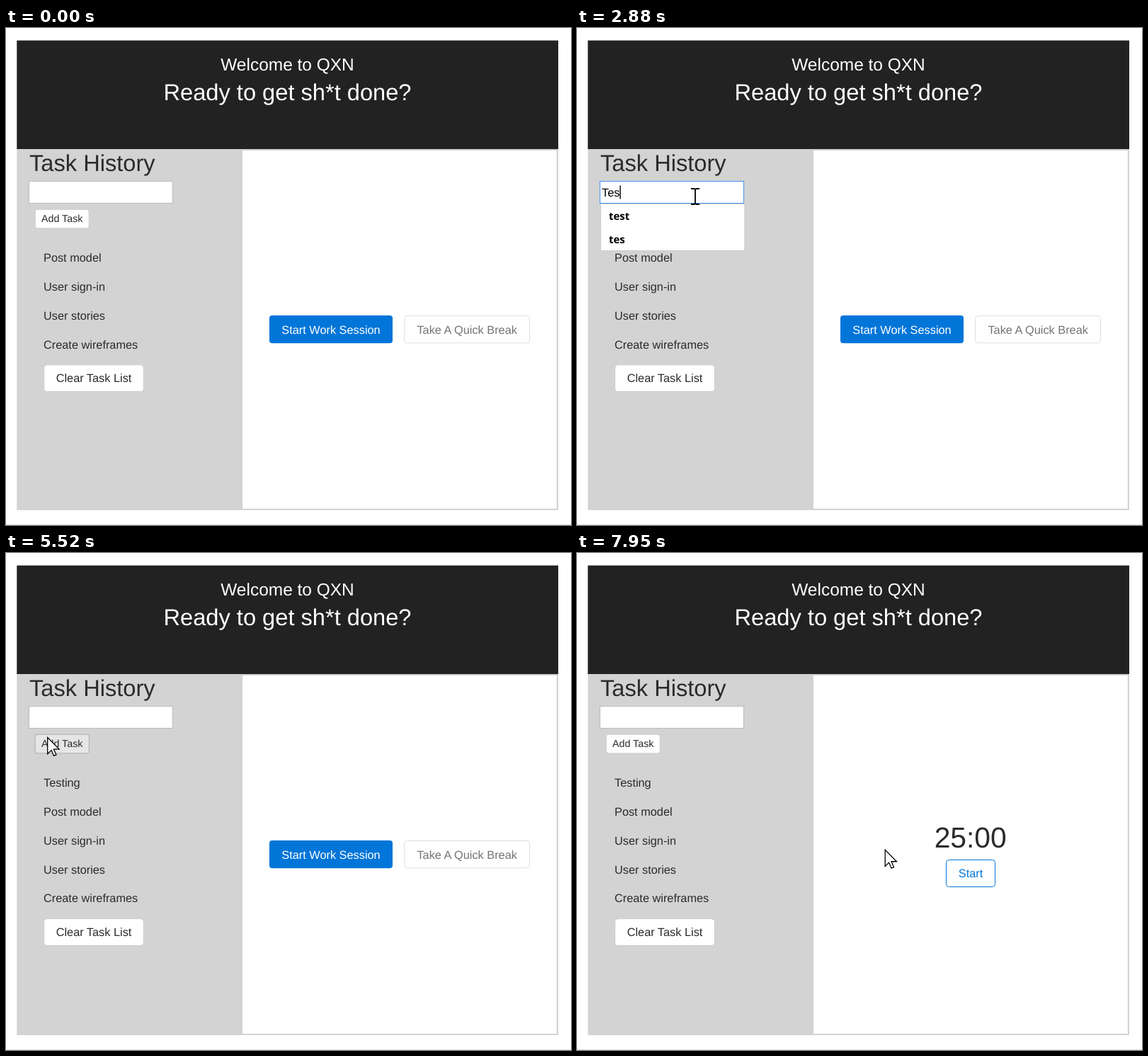
Write an HTML page that moves like this. It is 798 px wide and 702 px high and loops after 8000 ms.

```html
<!DOCTYPE html>
<html lang="en">
<head>
<meta charset="utf-8">
<title>Task timer</title>
<style>
html, body { margin: 0; width: 100%; height: 100%; overflow: hidden; background: #fff; }
svg { display: block; width: 100vw; height: 100vh; }
text { font-family: "Liberation Sans", Arial, sans-serif; font-size: 16.32px; fill: #292b2c; text-rendering: geometricPrecision; white-space: pre; }
.mid { text-anchor: middle; }
.light { fill: #fff; }
.h1 { font-size: 40.8px; }
.h2 { font-size: 32.64px; }
.h4 { font-size: 24.48px; }
.small { font-size: 14.28px; }
.hint { font: 700 15px "Open Sans", "Noto Sans", sans-serif; fill: #000; }
</style>
</head>
<body>
<svg viewBox="0 0 798 702">
  <rect width="798" height="702" fill="#fff"/>
  <rect x="15.3" y="170" width="764.7" height="511" fill="#d3d3d3"/>
  <rect x="334" y="173" width="443.7" height="506" fill="#fff"/>
  <rect x="15.3" y="17.6" width="764.7" height="153.4" fill="#222"/>
  <rect y="701" width="798" height="1" fill="#e2e2e2"/>

  <text class="mid light h4" x="397.5" y="59.5">Welcome to QXN</text>
  <text class="mid light h2" x="397.5" y="102">Ready to get sh*t done?</text>
  <text class="h2" x="33" y="202">Task History</text>

  <rect id="field" x="32.5" y="216.5" width="203" height="31" fill="#fff"/>
  <text id="typed" x="35" y="238" style="fill:#000"></text>
  <rect id="caret" y="222.5" width="1.4" height="19" fill="#000"/>

  <rect id="add" x="41.2" y="256.3" width="76" height="26.6" rx="3"/>
  <text class="small" x="50" y="274.3">Add Task</text>

  <g id="tasks"></g>
  <g id="clear">
    <rect x="53.7" y="475.8" width="140.6" height="37.8" rx="4" fill="#fff" stroke="#ccc"/>
    <text class="mid" x="124" y="500.3">Clear Task List</text>
  </g>

  <g id="choices">
    <rect id="work" x="372" y="406" width="174" height="39.3" rx="4"/>
    <text class="mid light" x="459" y="432">Start Work Session</text>
    <g opacity=".65">
      <rect x="562.6" y="406.6" width="177" height="38.2" rx="4" fill="#fff" stroke="#ccc"/>
      <text class="mid" x="651.2" y="432">Take A Quick Break</text>
    </g>
  </g>
  <g id="timer">
    <text class="mid h1" x="555.7" y="416.4">25:00</text>
    <rect x="521.5" y="433.5" width="69" height="38" rx="4" fill="#fff" stroke="#0275d8"/>
    <text class="mid" x="556" y="458.3" style="fill:#0275d8">Start</text>
  </g>

  <g id="menu">
    <rect id="sheet" x="33.5" y="248.5" width="203.3" fill="#fff" stroke="#ccc"/>
    <text class="hint" x="45" y="271"></text>
    <text class="hint" x="45" y="303.6"></text>
    <text class="hint" x="45" y="336.2"></text>
  </g>

  <path id="arrow" d="M0 0V17L4 13.2L6.5 19L9 18L6.5 12.1H12Z" fill="#fff" stroke="#000" stroke-width=".95"/>
  <path id="beam" d="M-6 -11H-1.5L0 -10L1.5 -11H6M0 -10V10M-6 11H-1.5L0 10L1.5 11H6" fill="none" stroke="#000" stroke-width="1.8"/>
</svg>
<script>
const LOOP = 8000, REFRESH = 78, BLINK = 550, ROW = 40.9;
const ENTER = 70, FOCUS = 1430, HOVER = 5210, BLUR = 5370, ADD = 5450, LEAVE = 5830, OPEN = 7090;

const $ = id => document.getElementById(id);
const set = (el, attrs) => { for (const k in attrs) el.setAttribute(k, attrs[k]); };
const show = (el, on) => set(el, { visibility: on ? 'visible' : 'hidden' });
const within = (t, a, b) => t >= a && t < b;
const lerp = (a, b, p) => a + (b - a) * p;
const clamp = p => Math.min(1, Math.max(0, p));
const ease = p => p * p * p * (p * (6 * p - 15) + 10);

const origin = { x: 656, y: 684 };
const moves = [
  { from: ENTER, to: 850, x: 175, y: 250 },
  { from: 850, to: 1250, x: 167, y: 238 },
  { from: 4660, to: 5060, x: 58.7, y: 260.6 },
  { from: 5750, to: 6380, x: 436.5, y: 414.8 },
  { from: 6450, to: 7950, x: 435.2, y: 419.3 }
];

const word = 'Testing';
const strokes = [2180, 2330, 2880, 3030, 3420, 3750, 3810];
const known = ['test', 'tes', 'term'];
const tasks = [word, 'Post model', 'User sign-in', 'User stories', 'Create wireframes'];
const hints = document.querySelectorAll('.hint');
const rows = tasks.map(name => {
  const row = document.createElementNS('http://www.w3.org/2000/svg', 'text');
  row.textContent = name;
  set(row, { x: 53 });
  $('tasks').append(row);
  return row;
});

// The pointer is repainted once per REFRESH while it moves.
function pointer(t) {
  let { x, y } = origin;
  for (const m of moves) {
    if (t < m.from) break;
    const shown = t < m.to ? Math.floor((t - m.from) / REFRESH) * REFRESH : m.to - m.from;
    const p = ease(shown / (m.to - m.from));
    x = lerp(x, m.x, p);
    y = lerp(y, m.y, p);
  }
  return { x, y };
}

function drawField(t) {
  const focus = within(t, FOCUS, BLUR);
  set($('field'), { stroke: focus ? '#4793f0' : '#bbb' });

  const pressed = strokes.filter(s => s <= t);
  const text = t < ADD ? word.slice(0, pressed.length) : '';
  $('typed').textContent = text;

  const last = pressed.length ? pressed[pressed.length - 1] : FOCUS - 110;
  const lit = Math.floor((t - last) / BLINK) % 2 === 0;
  set($('caret'), { x: 35 + (text ? $('typed').getComputedTextLength() : 0) });
  show($('caret'), focus && lit);

  const list = text ? known.filter(k => k.startsWith(text.toLowerCase())) : [];
  show($('menu'), list.length);
  set($('sheet'), { height: 33 * list.length });
  hints.forEach((h, i) => { h.textContent = list[i] || ''; });
}

function drawTasks(t) {
  const added = t >= ADD;
  rows.forEach((row, i) => set(row, { y: 329.8 + ROW * (added ? i : i - 1) }));
  show(rows[0], added);
  set($('clear'), { transform: `translate(0 ${added ? ROW : 0})` });
  const hover = within(t, HOVER, LEAVE);
  set($('add'), { fill: hover ? '#e6e6e6' : '#fff', stroke: hover ? '#adadad' : '#ccc' });
}

function drawPanel(t) {
  show($('choices'), t < OPEN);
  show($('timer'), t >= OPEN);
  const p = clamp((t - 6300) / 200);
  set($('work'), { fill: `rgb(2 ${lerp(117, 90, p)} ${lerp(216, 165, p)})` });
}

function drawPointer(t) {
  const { x, y } = pointer(t);
  const overField = within(x, 33, 235) && within(y, 217, 247.5);
  show($('arrow'), t >= ENTER && !overField);
  show($('beam'), t >= ENTER && overField);
  set($('arrow'), { transform: `translate(${x} ${y}) scale(1.36)` });
  set($('beam'), { transform: `translate(${x} ${y})` });
}

const start = performance.now();
function frame() {
  const t = (performance.now() - start) % LOOP;
  for (const draw of [drawField, drawTasks, drawPanel, drawPointer]) draw(t);
  requestAnimationFrame(frame);
}
frame();
</script>
</body>
</html>
```
